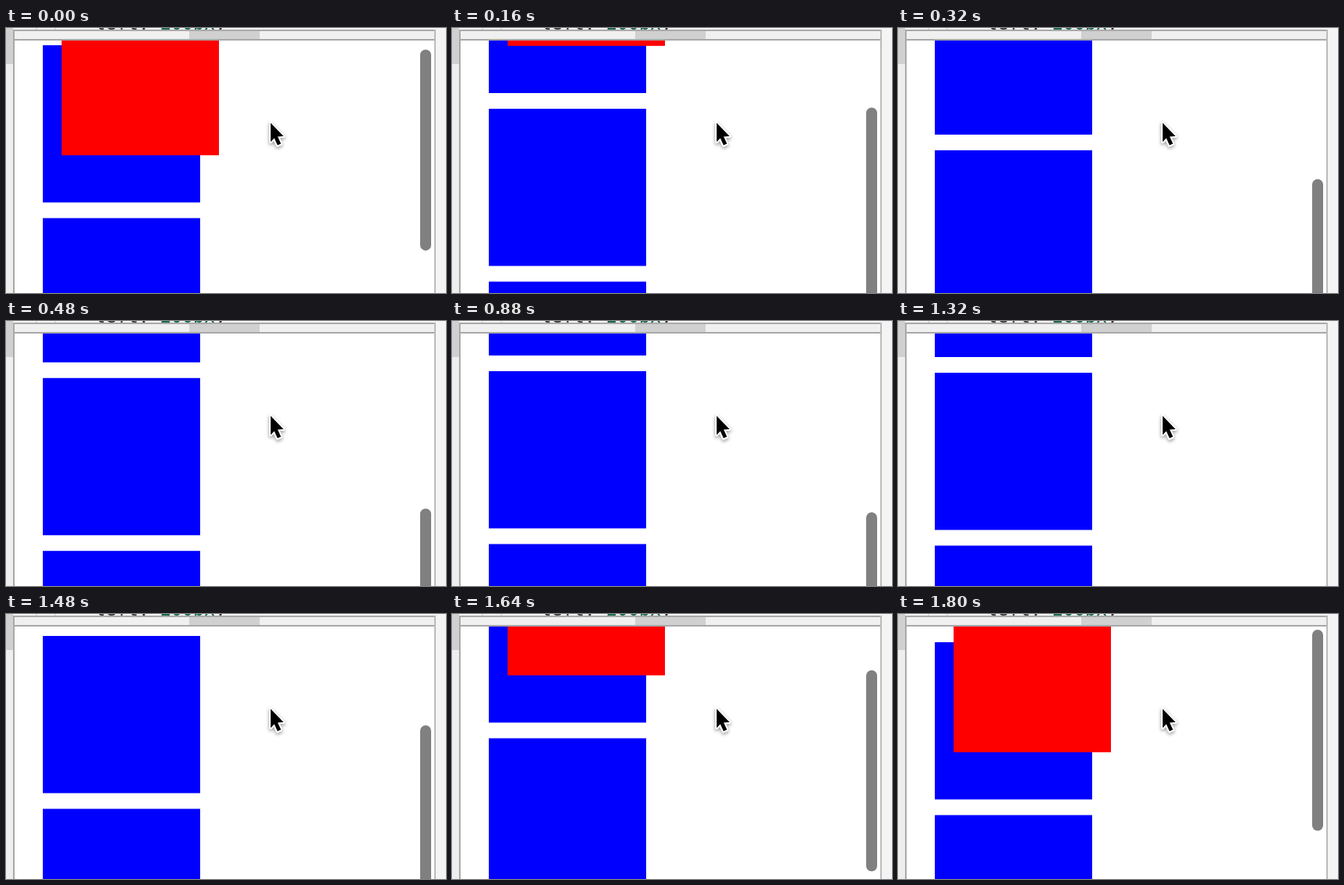
An HTML page with a canvas for the animation above (2.12 s loop, 562 by 338 pixels).

```html
<!DOCTYPE html>
<html lang="en">
<head>
<meta charset="utf-8">
<title>Scrolling boxes</title>
<style>
  html, body { margin: 0; height: 100%; overflow: hidden; background: #fff; }
  canvas { display: block; }
</style>
</head>
<body>
<canvas id="stage" width="562" height="338"></canvas>
<script>
const ctx = document.getElementById('stage').getContext('2d');
const LOOP = 2120, STEP = 40, MAX_SCROLL = 413;

// time (ms), scroll offset (px), speed (px/ms)
const KEYS = [
  [0, 14, 0.5], [320, 321, 0.85], [560, MAX_SCROLL, 0],
  [1280, MAX_SCROLL, 0], [1320, 411, -0.2], [1480, 228.5, -1.1],
  [1640, 98, -0.7], [1800, 0, -0.5],
];

const clamp = v => Math.min(1, Math.max(0, v));

function rect(color, x, y, w, h) {
  ctx.fillStyle = color;
  ctx.fillRect(x, y, w, h);
}

// Cubic Hermite interpolation between neighbouring keys
function scrollAt(t) {
  const i = KEYS.findIndex(key => key[0] > t);
  if (i < 0) return 0;
  const [t0, p0, v0] = KEYS[i - 1], [t1, p1, v1] = KEYS[i];
  const d = t1 - t0, u = (t - t0) / d, w = 1 - u;
  return w * w * ((1 + 2 * u) * p0 + u * d * v0)
       + u * u * ((3 - 2 * u) * p1 - w * d * v1);
}

function thumbOpacity(t) {
  return t < 1320 ? 1 - clamp((t - 920) / 200) : clamp((t - 1320) / 80);
}

function drawPage(scroll) {
  for (let i = 0; i < 4; i++) rect('#00f', 47, 36 + 220.5 * i - scroll, 201, 200.5);
  rect('#f00', 71, -24 - scroll, 201, 200.3);
}

function drawThumb(scroll, opacity) {
  const k = scroll / MAX_SCROLL;
  ctx.globalAlpha = opacity;
  ctx.fillStyle = '#808080';
  ctx.beginPath();
  ctx.roundRect(529, 20 + 224 * k - 2 * Math.sin(Math.PI * k), 14, 256.5, 7);
  ctx.fill();
  ctx.globalAlpha = 1;
}

function drawFrame() {
  rect('#f5f5f5', 0, 0, 562, 2);
  rect('#ddd', 38, 0, 2, 2);
  rect('#ddd', 62, 0, 2, 2);
  ctx.font = '23.3px "DejaVu Sans Mono", monospace';
  ctx.fillStyle = '#333';
  ctx.fillText('left:', 113, 2);
  ctx.fillText(';', 267, 2);
  ctx.fillStyle = '#164';
  ctx.fillText('200px', 197, 2);

  rect('#f0f0f0', 11, 4, 536, 10);
  rect('#d0d0d0', 234, 4, 90, 10);
  rect('#eee', 0, 0, 9, 338);
  rect('#d0d0d0', 0, 0, 9, 46);
  rect('#f4f4f4', 549, 0, 13, 338);
  rect('#a9a9a9', 9, 2, 540, 2);
  rect('#a9a9a9', 9, 14, 540, 2);
  rect('#a9a9a9', 9, 2, 2, 336);
  rect('#bbb', 547, 2, 2, 336);
}

function drawCursor() {
  const arrow = new Path2D('M338 121 L354.5 138 L347 138.6 L351.2 147.6 L346.8 149.6 L342.7 140.6 L338 145.2 Z');
  ctx.save();
  ctx.lineWidth = 4;
  ctx.lineJoin = 'round';
  ctx.strokeStyle = '#fff';
  ctx.shadowColor = 'rgba(0,0,0,.4)';
  ctx.shadowBlur = 4;
  ctx.shadowOffsetY = 2;
  ctx.stroke(arrow);
  ctx.restore();
  ctx.fillStyle = '#000';
  ctx.fill(arrow);
}

function render(now) {
  const t = Math.floor(now % LOOP / STEP) * STEP;
  const scroll = scrollAt(t);
  rect('#fff', 0, 0, 562, 338);
  ctx.save();
  ctx.beginPath();
  ctx.rect(11, 16, 536, 322);
  ctx.clip();
  drawPage(scroll);
  drawThumb(scroll, thumbOpacity(t));
  ctx.restore();
  drawFrame();
  drawCursor();
}

const start = performance.now();
(function tick() {
  render(performance.now() - start);
  requestAnimationFrame(tick);
})();
</script>
</body>
</html>
```
